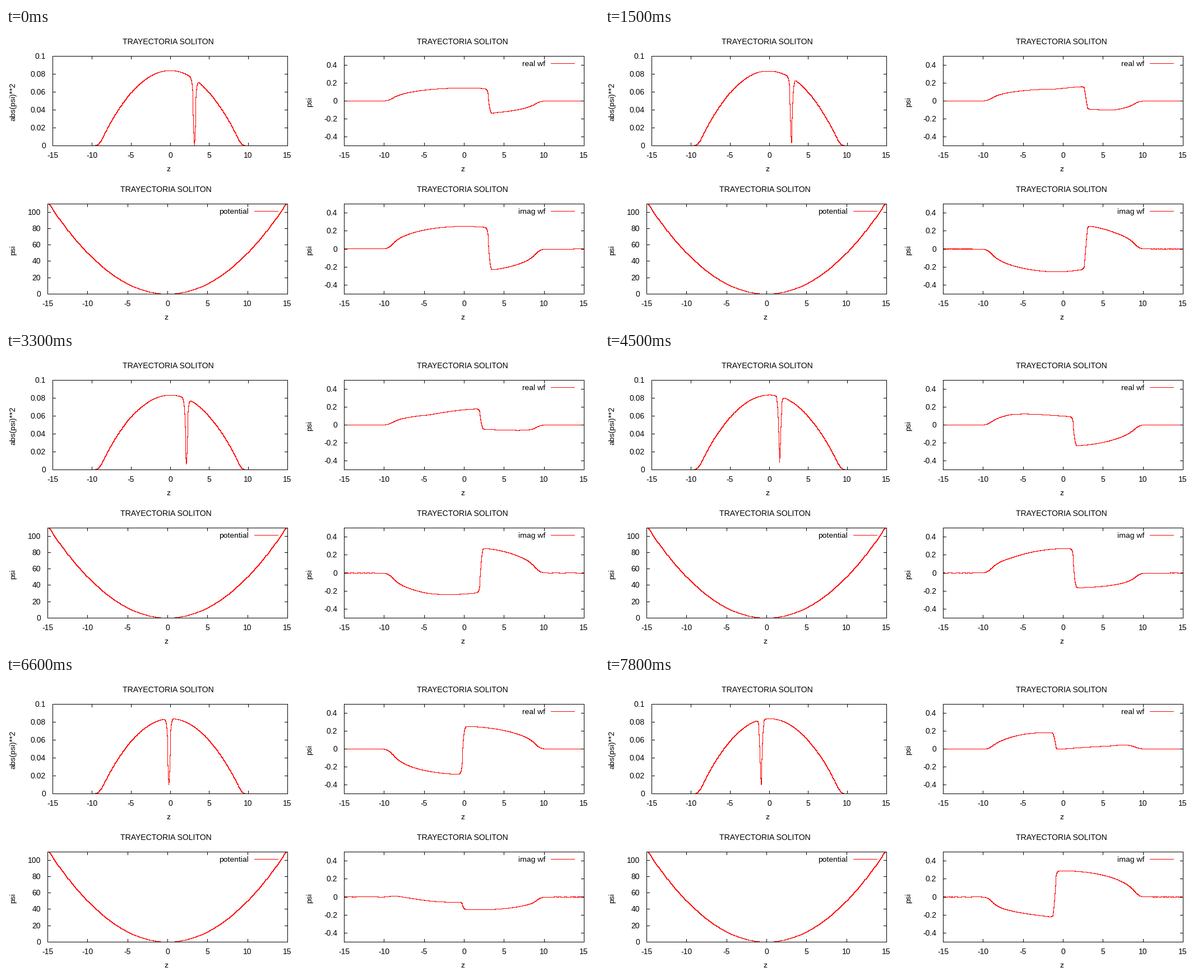
Animation of 1058 by 529 pixels, one loop 8 s. Source, as a matplotlib script:

```python
import numpy as np
import matplotlib.pyplot as plt
from matplotlib.animation import FuncAnimation

W, H, DPI = 1058, 529, 64
PX = 72 / DPI
RED, BLACK = "#ff0000", "#000000"
STATES, HOLD, FRAMES = 27, 3, 80

plt.rcParams.update({
    "font.family": "Liberation Sans",
    "font.size": 14 * PX,
    "text.hinting": "native",
    "text.hinting_factor": 8,
    "path.simplify": False,
})

# --- Gross-Pitaevskii dynamics of a dark soliton in a harmonic trap ---
N, L, G, Z0 = 1024, 30.0, 500.0, 3.1
LOOSE = 0.981   # the cloud is prepared in a slightly weaker trap
DZ = L / N
z = -L / 2 + DZ * np.arange(N)
k = 2 * np.pi * np.fft.fftfreq(N, DZ)
trap = z**2 / 2
kink = -np.tanh((z - Z0) * np.sqrt(42 - Z0**2 / 2))


def split_step(psi, dt, kinetic, pot):
    """One Strang step; dt is imaginary for real-time evolution."""
    psi = psi * np.exp(-dt / 2 * (pot + G * np.abs(psi)**2))
    psi = np.fft.ifft(kinetic * np.fft.fft(psi))
    return psi * np.exp(-dt / 2 * (pot + G * np.abs(psi)**2))


def ground_state(dt=0.001, steps=7000):
    psi = np.sqrt(np.maximum(42 - trap, 0) / G) + 1e-9
    kinetic = np.exp(-dt * k**2 / 2)
    for _ in range(steps):
        psi = split_step(psi, dt, kinetic, LOOSE * trap).real
        psi /= np.sqrt(np.sum((psi * kink)**2) * DZ)
    return psi


def evolve(dt=0.0005, steps=200):
    psi = (ground_state() * kink).astype(complex)
    kinetic = np.exp(-1j * dt * k**2 / 2)
    states = []
    for _ in range(STATES):
        for _ in range(steps):
            psi = split_step(psi, 1j * dt, kinetic, trap)
        states.append(psi)
    turn = np.exp(1j * (np.pi / 3 - np.angle(states[0][N // 2])))
    return [s * turn for s in states]


states = evolve()

# --- drawing in pixel coordinates ---
fig = plt.figure(figsize=(W / DPI, H / DPI), dpi=DPI, facecolor="white")
ax = fig.add_axes([0, 0, 1, 1])
ax.set(xlim=(0, W), ylim=(H, 0))
ax.axis("off")


def line(xs, ys, color, zorder=2):
    return ax.plot(np.asarray(xs) + 0.5, np.asarray(ys) + 0.5, color=color,
                   lw=PX, antialiased=False, snap=False, zorder=zorder,
                   solid_capstyle="butt", solid_joinstyle="miter")[0]


def label(x, baseline, text, ha="center", **kw):
    ax.text(x, baseline, text, ha=ha, va="baseline", color=BLACK, **kw)


def trace(xs, ys):
    """Walk a polyline pixel by pixel, so that it stays one pixel thick."""
    steps = np.maximum(np.abs(np.diff(xs)), np.abs(np.diff(ys)))
    dist = np.append(0, np.cumsum(steps))
    s = np.arange(dist[-1] + 1)
    return (np.floor(np.interp(s, dist, xs) + 0.5),
            np.floor(np.interp(s, dist, ys) + 0.5))


class Panel:
    def __init__(self, box, ylim, yticks, ylabel, ylabel_pos, mid, key=None):
        self.x0, self.x1, self.y0, self.y1 = box
        self.lo, self.hi = ylim
        x0, x1, y0, y1 = box
        line([x0, x1, x1, x0, x0, x1], [y0, y0, y1, y1, y0, y0], BLACK, 4)
        for v in range(-15, 16, 5):
            x = self.px(v)
            line([x, x], [y0, y0 + 5], BLACK, 4)
            line([x, x], [y1 - 5, y1], BLACK, 4)
            label(x, y1 + 22, str(v))
        for v in yticks:
            y = self.py(v)
            line([x0, x0 + 5], [y, y], BLACK, 4)
            line([x1 - 5, x1], [y, y], BLACK, 4)
            label(x0 - 12, y + 5, f"{v:g}", ha="right")
        label(mid, y0 - 21, "TRAYECTORIA SOLITON")
        label(mid, y1 + 46, "z")
        label(*ylabel_pos, ylabel, rotation=90, rotation_mode="anchor")
        if key:
            text, right = key
            label(right, y0 + 18, text, ha="right")
            line([right + 10, right + 52], [y0 + 13, y0 + 13], RED)
        self.curve = line([], [], RED, 3)

    def px(self, v):
        return np.floor(self.x0 + (v + 15) / 30 * (self.x1 - self.x0) + 0.5)

    def py(self, v):
        frac = (v - self.lo) / (self.hi - self.lo)
        return np.floor(self.y1 - frac * (self.y1 - self.y0) + 0.5)

    def plot(self, xs, ys):
        px, py = trace(self.px(xs), self.py(ys))
        self.curve.set_data(px + 0.5, py + 0.5)


WAVE = (-0.4, -0.2, 0, 0.2, 0.4)
density = Panel((83, 502, 50, 210), (0, 0.1), (0, 0.02, 0.04, 0.06, 0.08, 0.1),
                "abs(psi)**2", (16, 132), 289.5)
potential = Panel((74, 502, 314, 475), (0, 110), range(0, 101, 20),
                  "psi", (16, 397), 285.5, ("potential", 433))
real = Panel((603, 1031, 50, 210), (-0.5, 0.5), WAVE,
             "psi", (545, 132), 814.5, ("real wf", 962))
imag = Panel((603, 1031, 314, 475), (-0.5, 0.5), WAVE,
             "psi", (545, 397), 814.5, ("imag wf", 962))

edge = np.sqrt(2 * 110)
zs = np.linspace(-edge, edge, 200)
potential.plot(zs, zs**2 / 2)
z_shown = np.append(z, L / 2)[::2]


def update(n):
    psi = states[min(n // HOLD, STATES - 1)]
    psi = np.append(psi, psi[0])[::2]
    density.plot(z_shown, np.abs(psi)**2)
    real.plot(z_shown, psi.real)
    imag.plot(z_shown, psi.imag)
    return density.curve, real.curve, imag.curve


anim = FuncAnimation(fig, update, frames=FRAMES, interval=100,
                     repeat=True, repeat_delay=0, blit=False)
plt.show()
```
